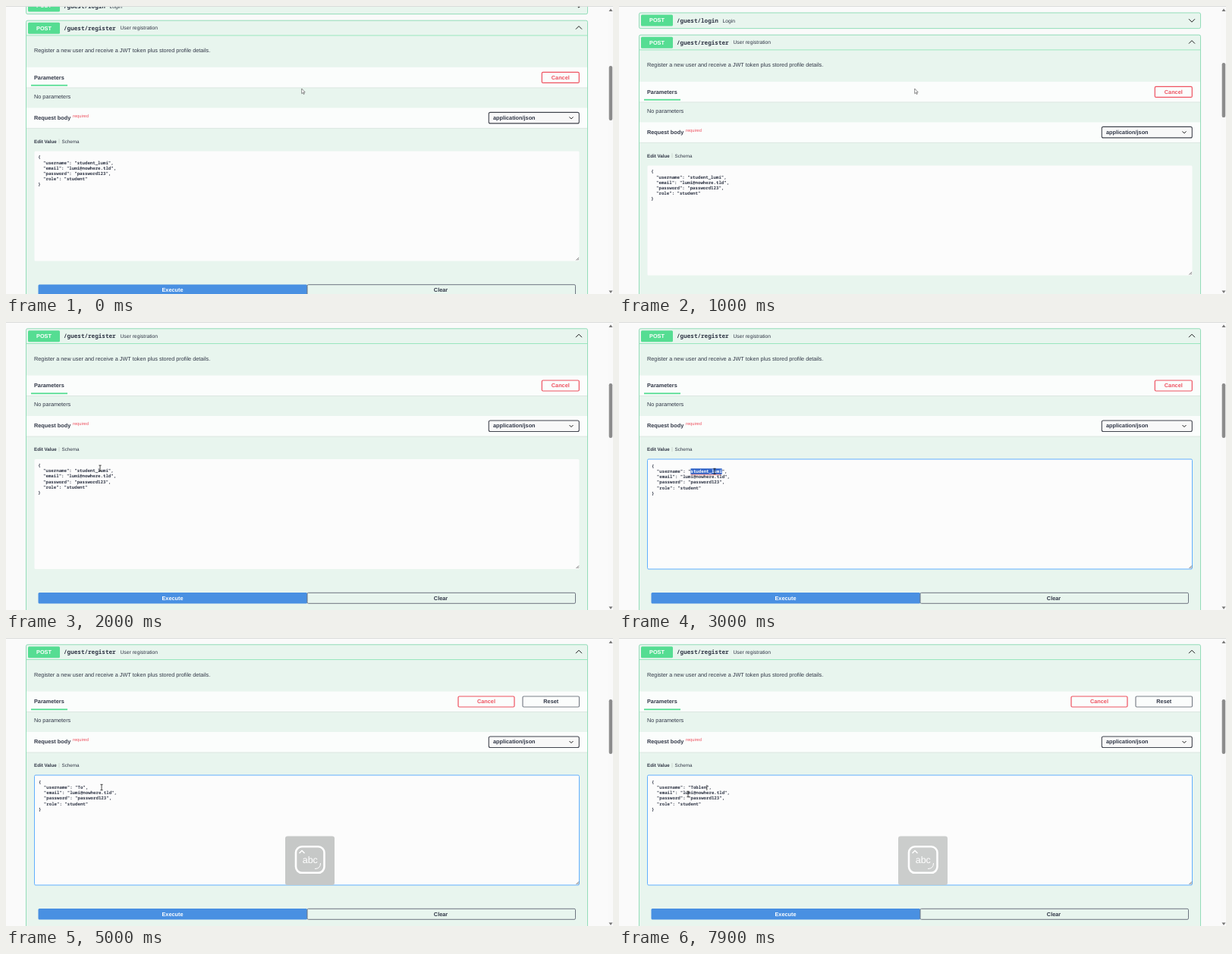
These frames come from a looping animation (800x380 px, 8 s). An HTML page:

```html
<!DOCTYPE html>
<html lang="en">
<head>
<meta charset="utf-8">
<title>Register form</title>
<style>
html, body { margin: 0; width: 100%; height: 100%; overflow: hidden; background: #fafafa; }
svg { display: block; width: 800px; height: 380px; }
text { font: 7.31px "Liberation Sans", Arial, sans-serif; fill: #303646; text-rendering: geometricPrecision; }
.b { font-weight: 700; }
.m { text-anchor: middle; }
.small { font-size: 6.24px; }
.info { font-size: 6.76px; }
.path, .code { font-family: "Noto Sans Mono", "DejaVu Sans Mono", monospace; font-weight: 600; }
.path { font-size: 7.63px; }
.code { font-size: 5.72px; }
.white { fill: #fff; }
.red { fill: #ee5260; }
.line { fill: none; stroke: #1c1c1c; }
</style>
</head>
<body>
<svg viewBox="0 0 800 380">
  <defs>
    <filter id="shade" x="-5%" y="-20%" width="110%" height="150%">
      <feDropShadow dx="0" dy="0" stdDeviation="0.6" flood-opacity=".19"/>
    </filter>
    <g id="head">
      <rect x="29" y="11.3" width="42" height="15" rx="1.5" fill="#55dd92"/>
      <text class="b m white" x="50" y="21.2">POST</text>
    </g>
  </defs>
  <rect width="800" height="380" fill="#fafafa"/>

  <g id="page">
    <g filter="url(#shade)" fill="#e8f5ee" stroke="#5fd39b" stroke-width=".6">
      <rect x="26.5" y="-20.4" width="740" height="20.6" rx="2"/>
      <rect x="26.5" y="8.8" width="740" height="420" rx="2"/>
    </g>
    <use href="#head" y="-29.2"/>
    <text class="path" x="76" y="-7.7">/guest/login</text>
    <text class="info" x="136.5" y="-7.9">Login</text>
    <path class="line" d="M751-12.2l4 4 4-4"/>

    <use href="#head"/>
    <path d="M27 28.5H766" stroke="#66dc9e" stroke-width=".6"/>
    <text class="path" x="76" y="21.3">/guest/register</text>
    <text class="info" x="150.5" y="20.8">User registration</text>
    <path class="line" d="M751 20.2l4-4 4 4"/>
    <text x="37" y="50.8">Register a new user and receive a JWT token plus stored profile details.</text>

    <g fill="#fbfdfc">
      <rect x="27" y="70.5" width="739" height="27"/>
      <rect x="27" y="124" width="739" height="27"/>
      <path d="M27 97.5H766M27 151H766" stroke="#d6e2dc" stroke-width=".8"/>
    </g>
    <text class="b" x="37" y="86.4">Parameters</text>
    <rect x="33" y="93.4" width="48" height="1.8" fill="#55dd92"/>
    <g id="buttons" fill="none"></g>
    <text x="37" y="111.3">No parameters</text>

    <text class="b" x="37" y="139.4">Request body</text>
    <text class="red" x="88" y="136.2" style="font-size:5.72px">required</text>
    <rect x="636.3" y="130" width="119" height="14.5" rx="2" fill="#f8f8f8" stroke="#41444e" stroke-width="1.1"/>
    <text class="b" x="642" y="139.4">application/json</text>
    <path class="line" d="M742.5 136l2.5 2.5 2.5-2.5"/>

    <text class="b small" x="37" y="170.2">Edit Value</text>
    <path d="M70 165v6" stroke="#b5bfba" stroke-width=".6"/>
    <text class="small" x="73.5" y="170.2">Schema</text>

    <rect id="area" x="37.5" y="181" width="718" height="145" rx="1.5" fill="#fcfcfc"/>
    <path class="line" stroke-width=".6" d="M751.5 325l3.5-3.5M753.5 325l1.5-1.5"/>
    <g id="code">
      <rect id="sel" y="192.4" height="7.6" fill="#3164c8"/>
      <path id="squiggle" fill="none" stroke="#e02a2a" stroke-width=".7"/>
      <rect id="caret" y="193" width=".8" height="7" fill="#222"/>
    </g>

    <rect x="42.5" y="357" width="354.5" height="14.5" rx="1.5" fill="#4990e2"/>
    <text class="b m white" x="219.5" y="366.7">Execute</text>
    <rect x="397" y="357.3" width="353.5" height="14" rx="1.5" fill="none" stroke="#6d7480"/>
    <text class="b m" x="573" y="366.7">Clear</text>
  </g>

  <rect width="800" height="1" fill="#dadcdb"/>
  <rect x="793" y="1" width="7" height="379" fill="#f9f9f9"/>
  <path d="M794.5 7l2.5-3.5 2.5 3.5zM794.5 375.5l2.5 3.5 2.5-3.5z" fill="#777"/>
  <rect id="thumb" x="794.7" width="4.5" height="72" rx="2.2" fill="#8c8c8c"/>

  <g id="caps">
    <rect x="368" y="261.5" width="65" height="64.5" rx="3" fill="#c6c8c7"/>
    <g fill="none" stroke="#fff">
      <rect x="382" y="275.3" width="37.5" height="34.5" rx="8" stroke-width="2.6"/>
      <path d="M386.5 284l3.5-3.5 3.5 3.5" stroke-width="1.5"/>
      <path d="M407 304.5q7.5 0 7.5-7.5" stroke-width="1"/>
    </g>
    <text id="letters" class="m white" x="400.8" y="297.3" style="font-size:12.5px"></text>
  </g>

  <path id="arrow" d="M0 0v6.6l1.5-1.3 1.1 2.2 1-.5-1.1-2.2h2z" fill="#fff" stroke="#444" stroke-width=".6"/>
  <path id="beam" class="line" stroke-width=".8" d="M-1.6-3.7h3.2M0-3.7v7.4M-1.6 3.7h3.2"/>
</svg>
<script>
const $ = id => document.getElementById(id);
const set = (id, attrs) => { for (const k in attrs) $(id).setAttribute(k, attrs[k]); };
const show = (id, on) => set(id, { visibility: on ? 'visible' : 'hidden' });

const LOOP = 8000, CHAR = 3.432, LEFT = 42.2;
const NAME_X = LEFT + 15 * CHAR;
const OLD = 'student_lumi', NEW = 'Toblen';
const KEYS = [4150, 4450, 5250, 5600, 5950, 6350];
const DOUBLE_CLICK = 2500, CAPS_ON = 3600, CAPS_OFF = 4300;

// time, value...
const SCROLL = [[0, 10.4], [200, 29.4], [1100, 29.4], [1200, 0]];
const MOUSE = [[1300, 389.7, 109], [1850, 124, 192], [2050, 124, 193], [2300, 126, 197],
  [6900, 126, 197], [7600, 91, 206]];

function track(keys, t) {
  const i = keys.findIndex(k => k[0] > t);
  if (i === 0) return keys[0].slice(1);
  if (i < 0) return keys[keys.length - 1].slice(1);
  const [a, b] = [keys[i - 1], keys[i]];
  const p = (t - a[0]) / (b[0] - a[0]), e = p * p * (3 - 2 * p);
  return a.slice(1).map((v, n) => v + (b[n + 1] - v) * e);
}

function addText(content, x, y) {
  const el = document.createElementNS('http://www.w3.org/2000/svg', 'text');
  el.setAttribute('class', 'code');
  el.setAttribute('x', x);
  el.setAttribute('y', y);
  el.innerHTML = content;
  $('code').append(el);
}

const rows = ['{', '"username": "<tspan id="name"></tspan>",', '"email": "lumi@nowhere.tld",',
  '"password": "password123",', '"role": "student"', '}'];
rows.forEach((row, i) => addText(row, LEFT + (i % 5 ? 2 * CHAR : 0), 191 + i * 7.2));

set('sel', { x: NAME_X, width: OLD.length * CHAR });
set('squiggle', { d: `M${NAME_X} 201` + 'l1 -.8l1 .8'.repeat(20) });

const button = (label, x, w, color, cls) =>
  `<rect x="${x}" y="77" width="${w}" height="14" rx="1.5" stroke="${color}" stroke-width="1.2"/>
   <text class="b m ${cls}" x="${x + w / 2}" y="86.4">${label}</text>`;
const single = button('Cancel', 706.3, 49, '#ee5260', 'red');
const pair = button('Cancel', 596, 74, '#ee5260', 'red') + button('Reset', 681, 74.5, '#7c818a', '');
let shown;

function draw(t) {
  const [offset] = track(SCROLL, t);
  set('page', { transform: `translate(0 ${offset})` });
  set('thumb', { y: 81 - offset * .2 });

  const focused = t >= DOUBLE_CLICK, typed = KEYS.filter(k => k <= t).length;
  const selected = focused && !typed;
  set('area', { stroke: focused ? '#61affe' : 'none' });
  set('code', { transform: focused ? 'translate(.8 .9)' : '' });

  $('name').textContent = typed ? NEW.slice(0, typed) : OLD;
  set('name', { class: selected ? 'white' : '' });
  show('sel', selected);
  show('squiggle', selected);
  set('caret', { x: NAME_X + typed * CHAR + .4 });
  show('caret', typed && (t - KEYS[typed - 1]) % 1060 < 530);

  const buttons = typed ? pair : single;
  if (buttons !== shown) $('buttons').innerHTML = shown = buttons;

  show('caps', t >= CAPS_ON);
  set('caps', { opacity: t > 7800 ? 1 - (t - 7800) / 1000 : 1 });
  $('letters').textContent = t < CAPS_OFF ? 'ABC' : 'abc';

  const [x, y] = track(MOUSE, t), inText = y > 181 + offset;
  for (const id of ['arrow', 'beam']) {
    set(id, { transform: `translate(${x} ${y})` });
    show(id, inText === (id === 'beam') && !(selected && t >= CAPS_ON));
  }
}

function tick() {
  draw(performance.now() % LOOP);
  requestAnimationFrame(tick);
}
tick();
</script>
</body>
</html>
```
